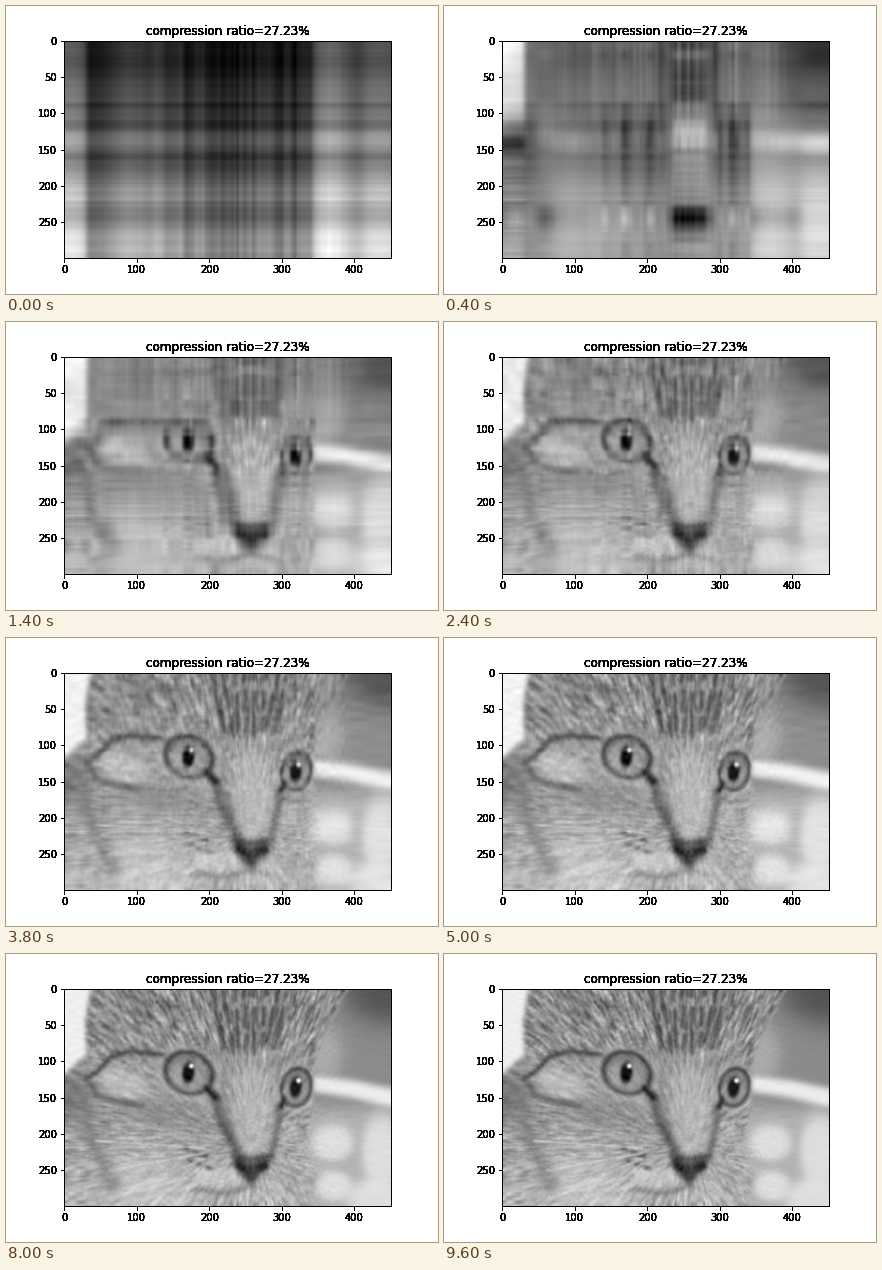
Recreate the animation shown at these times as a matplotlib script. Size 432 px wide and 288 px high, loop 9.8 s.

```python
import numpy as np
import matplotlib.pyplot as plt
from matplotlib.animation import FuncAnimation
from matplotlib.path import Path

W, H = 451, 300
RANKS = 49
X, Y = np.meshgrid(np.arange(W, dtype=float), np.arange(H, dtype=float))
NOSE = np.array([258, 215])
rng = np.random.default_rng(4)


def blur(img, sigma):
    n = int(3 * sigma) + 1
    kernel = np.exp(-.5 * (np.arange(-n, n + 1) / sigma) ** 2)
    kernel /= kernel.sum()
    for axis in (0, 1):
        pad = [(0, 0), (0, 0)]
        pad[axis] = (n, n)
        img = np.apply_along_axis(np.convolve, axis,
                                  np.pad(img, pad, mode="edge"), kernel, "valid")
    return img


def paint(img, tone, mask):
    img += (tone - img) * mask


def polygon(points, soft):
    inside = Path(points).contains_points(np.c_[X.ravel(), Y.ravel()])
    return blur(inside.reshape(H, W).astype(float), soft)


def oval(cx, cy, rx, ry, tilt=0, soft=.05):
    a = np.radians(tilt)
    u = (X - cx) * np.cos(a) + (Y - cy) * np.sin(a)
    v = (Y - cy) * np.cos(a) - (X - cx) * np.sin(a)
    edge = (np.hypot(u / rx, v / ry) - 1) / soft
    return 1 / (1 + np.exp(np.clip(edge, -50, 50)))


def line(points, width):
    """Soft mask of a polyline."""
    near = np.full((H, W), 1e9)
    for (x0, y0), (x1, y1) in zip(points, points[1:]):
        dx, dy = x1 - x0, y1 - y0
        f = np.clip(((X - x0) * dx + (Y - y0) * dy) / (dx * dx + dy * dy), 0, 1)
        near = np.minimum(near, (X - x0 - f * dx) ** 2 + (Y - y0 - f * dy) ** 2)
    return np.exp(-near / width ** 2)


def fur():
    """Noise smeared along lines that fan out from the nose."""
    noise = blur(rng.normal(size=(H, W)), .8)
    dx, dy = X - NOSE[0], Y - NOSE[1]
    size = np.hypot(dx, dy) + 1
    out = np.zeros((H, W))
    for t in range(-6, 7):
        col = np.clip(np.rint(X + t * dx / size), 0, W - 1).astype(int)
        row = np.clip(np.rint(Y + t * dy / size), 0, H - 1).astype(int)
        out += noise[row, col]
    return out / out.std()


def eye(img, x, y, rx, ry, tilt):
    paint(img, .68, .6 * oval(x, y + 2, rx * 1.25, ry * 1.25, tilt, .07))
    paint(img, .2, oval(x, y, rx, ry, tilt))
    paint(img, .5, oval(x, y, rx * .85, ry * .86, tilt))
    paint(img, .62, .8 * oval(x - 2, y + 6, rx * .65, ry * .6, tilt, .15))
    paint(img, .1, oval(x - 1, y, 8, 14, 6, .15))
    paint(img, 1, .9 * oval(x + 3, y - 9, 3, 3, 0, .2))


def background():
    img = .53 + .13 / (1 + np.exp((165 - Y) / 6))
    paint(img, .86, oval(0, 45, 60, 95, 0, .06))
    paint(img, .34, oval(445, 5, 60, 42, 10, .25))
    paint(img, .68, .7 * oval(352, 90, 30, 40, 0, .2))
    paint(img, .85, polygon([(335, 120), (400, 127), (460, 140), (460, 166),
                             (400, 151), (335, 140)], 4))
    for x, y, rx, ry in [(370, 212, 28, 24), (437, 225, 26, 50),
                         (372, 272, 24, 20), (430, 290, 40, 28)]:
        paint(img, .83, .85 * oval(x, y, rx, ry, 0, .12))
    return img


def forehead(face):
    """Broken dark stripes that close in towards the nose."""
    for s in np.linspace(-1, 1, 8):
        for y in (-5, 27, 58):
            y0 = y + rng.uniform(-6, 6)
            y1 = y0 + rng.uniform(16, 28)
            xs = [256 + s * (52 - .22 * v) + rng.uniform(-2, 2) for v in (y0, y1)]
            paint(face, .27, .7 * line(list(zip(xs, (y0, y1))), 3.8))
    # Thinner tabby streaks on both sides
    for _ in range(26):
        x, y = rng.uniform(95, 335), rng.uniform(0, 65)
        out = (np.array([x, y]) - NOSE) / np.hypot(*(np.array([x, y]) - NOSE))
        paint(face, .42, .45 * line([(x, y), np.array([x, y]) + 20 * out], 3))


def muzzle(face):
    paint(face, .7, .8 * oval(259, 165, 26, 62, 0, .2))
    paint(face, .75, .7 * oval(215, 262, 32, 16, 15, .25))
    paint(face, .33, .8 * line([(204, 138), (213, 168), (226, 200), (240, 228)], 8))
    paint(face, .4, .75 * line([(298, 156), (295, 190), (286, 228)], 6))
    paint(face, .28, polygon([(229, 227), (256, 232), (290, 226), (276, 250),
                              (257, 272), (242, 254)], 3))
    paint(face, .45, .6 * oval(260, 238, 12, 5, 0, .3))
    for side in (-1, 1):
        paint(face, .14, .8 * oval(258 + 15 * side, 246, 9, 5, -25 * side, .3))
    paint(face, .45, .6 * line([(256, 272), (225, 282), (190, 278)], 5))
    for i in range(3):
        for j in range(2):
            dot = 168 + 13 * i + 6 * j, 221 + 5 * i + 16 * j
            paint(face, .34, .8 * oval(*dot, 5, 3, 10, .3))


def cheeks(face):
    paint(face, .72, .8 * oval(82, 130, 34, 20, 20, .2))
    paint(face, .5, .6 * oval(140, 172, 50, 20, 10, .3))
    paint(face, .74, .8 * oval(105, 282, 58, 45, 25, .25))
    paint(face, .42, .8 * oval(2, 150, 34, 32, 0, .25))
    paint(face, .48, .7 * line([(20, 150), (38, 205), (66, 270)], 13))
    paint(face, .32, .9 * line([(30, 124), (45, 115), (64, 95), (92, 86), (138, 92)], 4))
    paint(face, .4, .8 * line([(36, 130), (44, 147), (72, 156), (108, 162)], 4.5))


def whiskers(img):
    for i in range(5):
        a = np.radians(-4 + 14 * i)
        x, y, size = 193, 220 + 7 * i, 150 - 15 * i
        end = x - size * np.cos(a), y + size * np.sin(a)
        paint(img, .88, .55 * line([(x, y), end], 1))
        if i < 2:
            paint(img, .85, .4 * line([(308, y + 8), (378, y + 12 + 16 * i)], 1))


def cat():
    img = background()
    head = polygon([(38, -9), (28, 45), (31, 90), (-9, 126), (-9, 310),
                    (335, 310), (346, 260), (330, 215), (343, 170),
                    (345, 105), (352, 75), (398, -9)], 3)
    face = .52 + .13 * Y / H
    face += .05 * fur() * (1 + .4 * (Y < 95))
    forehead(face)
    cheeks(face)
    muzzle(face)
    eye(face, 172, 116, 36, 30, 22)
    eye(face, 320, 136, 22, 28, 15)
    paint(face, .18, line([(197, 138), (207, 150)], 5))
    paint(face, .22, line([(303, 152), (299, 163)], 4))
    face += .025 * fur()
    paint(img, face, head)
    whiskers(img)
    return blur(img, .7)


U, S, V = np.linalg.svd(cat(), full_matrices=False)

fig = plt.figure(figsize=(6, 4), dpi=72, facecolor="white")
fig.subplots_adjust(left=.125, right=.9, bottom=.125, top=.88)

# Stacked axes give the lettering its hard, heavy edges
layers = [fig.add_subplot() for _ in range(10)]
image = layers[0].imshow(np.zeros((H, W)), cmap="gray")
ratio = RANKS * (W + H + 1) / (W * H)
for ax in layers:
    ax.set_aspect("equal")
    ax.set_xlim(-.5, W - .5)
    ax.set_ylim(H - .5, -.5)
    ax.set_xticks(range(0, W, 100))
    ax.set_yticks(range(0, H, 50))
    ax.patch.set_visible(False)
    ax.set_title(f"compression ratio={ratio:.2%}", fontsize=12)


def draw(i):
    """Show the picture rebuilt from its first i + 1 singular values."""
    k = i + 1
    image.set_data((U[:, :k] * S[:k]) @ V[:k])
    image.autoscale()
    return [image]


anim = FuncAnimation(fig, draw, frames=RANKS, interval=200, repeat=True)
plt.show()
```
